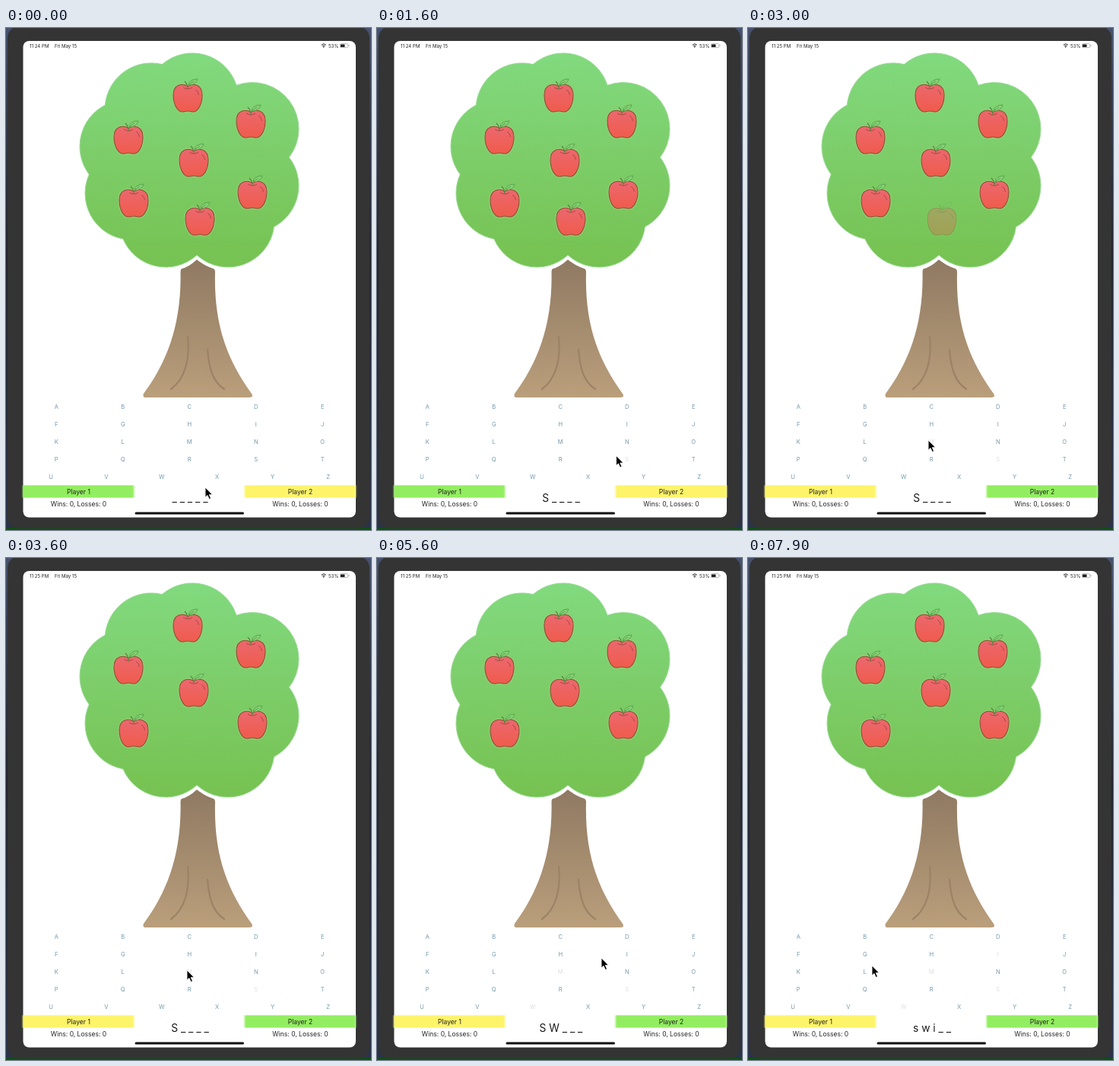
These frames come from a looping animation (480x659 px, 8 s). An HTML page:

```html
<!DOCTYPE html>
<html lang="en">
<head>
<meta charset="utf-8">
<title>Apple tree word game</title>
<style>
  html, body { margin: 0; width: 100%; height: 100%; overflow: hidden; background: #343434; }
  svg { display: block; width: 480px; height: 659px; }
  text { font-family: Inter, Roboto, sans-serif; fill: #222; }
  .mid { text-anchor: middle; }
  .status { font-size: 6.1px; }
  .label { font-size: 8.5px; }
  #keys text { font-size: 7.6px; fill: #7299ad; text-anchor: middle; }
  #word { font-size: 13.8px; fill: #1a1a1a; }
</style>
</head>
<body>
<svg viewBox="0 0 480 659">
  <defs>
    <linearGradient id="edge" x2="0" y2="1">
      <stop stop-color="#465270"/><stop offset=".12" stop-color="#364055"/>
      <stop offset=".45" stop-color="#20242f"/><stop offset="1" stop-color="#29334a"/>
    </linearGradient>
    <linearGradient id="crown" x2="0" y2="1">
      <stop stop-color="#81da7e"/><stop offset=".45" stop-color="#7dce6b"/><stop offset="1" stop-color="#76c251"/>
    </linearGradient>
    <linearGradient id="bark" x2="0" y2="1">
      <stop stop-color="#8f7962"/><stop offset="1" stop-color="#ba9f7b"/>
    </linearGradient>
    <linearGradient id="skin" x2="0" y2="1">
      <stop stop-color="#eb686f"/><stop offset="1" stop-color="#f05b4b"/>
    </linearGradient>
    <filter id="soft" x="-10%" y="-30%" width="120%" height="160%"><feGaussianBlur stdDeviation=".8 .3"/></filter>
    <path id="body" d="M0-15.500C-7-20-19-18-19-4C-19 9-13 18-7 18C-4 18-3 17 0 17C3 17 4 18 7 18C13 18 19 9 19-4C19-18 7-20 0-15.500Z"/>
    <g id="apple">
      <use href="#body" fill="none" stroke="#90d276" stroke-width="3.500"/>
      <use href="#body" fill="url(#skin)" stroke="#8a5234" stroke-width="1.100"/>
      <path d="M-6-14Q0-10 6-14M10-11Q14-9 14.500-4" fill="none" stroke="#a8453a" stroke-width=".9"/>
      <path d="M0-12Q0-18-4-22" fill="none" stroke="#5a8440" stroke-width="1.200"/>
      <path d="M1-17Q2-25 13-25Q11-17 1-17ZM2-18L8-22" fill="#83d274" stroke="#5a9f4b" stroke-width=".9"/>
    </g>
  </defs>

  <rect width="480" height="659" fill="url(#edge)"/>
  <rect y="656" width="480" height="3" fill="#104d17"/>
  <rect x="2" y="-2" width="476" height="659" rx="15" fill="#343434"/>
  <rect x="22.500" y="17" width="437.500" height="625.500" rx="8" fill="#fff"/>

  <text class="status" id="clock" x="31" y="25.500"></text>
  <text class="status" x="64" y="25.500">Fri May 15</text>
  <g fill="none" stroke="#222">
    <path d="M414.800 22.200Q417.800 19.400 420.800 22.200M416.100 23.800Q417.800 22.200 419.500 23.800"/>
    <circle cx="417.800" cy="25" r=".4"/>
    <rect x="439.300" y="20.700" width="10.500" height="5" rx="1.300" stroke="#888" stroke-width=".6"/>
    <path d="M451 22.400v1.600" stroke="#888" stroke-width=".7"/>
  </g>
  <rect x="440" y="21.400" width="5.500" height="3.600" rx=".6" fill="#222"/>
  <text class="status" x="424" y="25.500">53%</text>

  <path d="M251 304Q240 314 231 316Q229.500 317 229.500 320C231 390 211 440 181 480Q179 485 184 485H320Q326 485 323 480C291 435 273 390 275 320Q275 317 273 316Q262 313 251 304Z" fill="url(#bark)"/>
  <path d="M239 405C242 436 235 461 217 474M265 422C267 449 273 465 287 474" fill="none" stroke="#9c8266" stroke-width="2.200" stroke-linecap="round"/>
  <path id="canopy" fill="url(#crown)" stroke="#9bdb96" stroke-width="1"/>
  <g id="apples"></g>

  <g id="keys"></g>
  <g filter="url(#soft)">
    <rect id="bar1" x="22" y="600.300" width="146.300" height="16.300"/>
    <rect id="bar2" x="313.700" y="600.300" width="146.300" height="16.300"/>
  </g>
  <g class="mid">
    <text class="label" x="95.500" y="611.700">Player 1</text>
    <text class="label" x="387" y="611.700">Player 2</text>
    <text class="label" x="95.500" y="627.600">Wins: 0, Losses: 0</text>
    <text class="label" x="387" y="627.600">Wins: 0, Losses: 0</text>
    <text id="word" x="242" y="621.800"></text>
  </g>
  <rect x="169.500" y="635.500" width="143.500" height="3" rx="1.500" fill="#111"/>
  <path id="cursor" d="M0 0V13.200L3 10.500L5.200 15.500L7.500 14.500L5.300 9.700H9.500Z" fill="#000" stroke="#fff" stroke-width=".9"/>
</svg>
<script>
const LOOP = 8000;
const TAP = { S: 1300, M: 2800, W: 4700, I: 6400 };
const CLOCK_TICK = 1700;
const GREEN = '#92ee60', YELLOW = '#fdf46b';

// Cursor stops: time, x, y
const PATH = [
  [0, 262, 603], [100, 262, 603], [750, 329, 565], [1400, 329, 565],
  [2200, 237, 542], [2900, 237, 541], [3700, 238, 541], [4500, 205, 587],
  [4900, 205, 587], [5600, 295, 525], [6100, 331, 516], [6950, 331, 516],
  [7900, 163, 535], [8000, 150, 533]
];

const $ = id => document.getElementById(id);
const clamp = v => Math.max(0, Math.min(1, v));

function add(parent, tag, attrs, text = '') {
  const el = document.createElementNS('http://www.w3.org/2000/svg', tag);
  for (const name in attrs) el.setAttribute(name, attrs[name]);
  el.textContent = text;
  return parent.appendChild(el);
}

// Canopy lobes: equal circles, clockwise from the top
const LOBE = 61;
const lobes = [[245, 94], [324, 132.5], [324, 207], [292, 253], [210, 253], [165, 217], [158, 155.5], [191, 107]];

// Outer crossing point of two neighbouring lobes
function notch([ax, ay], [bx, by]) {
  const dx = bx - ax, dy = by - ay, d = Math.hypot(dx, dy);
  const h = Math.sqrt(LOBE ** 2 - d * d / 4) / d;
  return [(ax + bx) / 2 + dy * h, (ay + by) / 2 - dx * h];
}

const notches = lobes.map((lobe, i) => notch(lobe, lobes[(i + 1) % lobes.length]));
$('canopy').setAttribute('d',
  `M${notches.at(-1)}` + notches.map(p => `A${LOBE} ${LOBE} 0 0 1 ${p}`).join('') + 'Z');

const apples = [[239, 92], [322, 126], [161, 147], [247, 177], [168, 230], [324, 219], [255, 254]]
  .map(([x, y]) => add($('apples'), 'use', { href: '#apple', x, y }));

const keys = {};
['ABCDE', 'FGHIJ', 'KLMNO', 'PQRST', 'UVWXYZ'].forEach((row, r) => {
  const pitch = 437.5 / row.length;
  [...row].forEach((letter, c) => {
    keys[letter] = add($('keys'), 'text', { x: 22.5 + pitch * (c + .5), y: 499.8 + 23 * r }, letter);
  });
});

function cursorAt(t) {
  const i = Math.max(1, PATH.findIndex(p => p[0] >= t));
  const [t0, x0, y0] = PATH[i - 1], [t1, x1, y1] = PATH[i];
  const k = clamp((t - t0) / (t1 - t0));
  const e = k * k * (3 - 2 * k);
  return [x0 + (x1 - x0) * e, y0 + (y1 - y0) * e];
}

function render(t) {
  const word = t < TAP.S ? '_____' : t < TAP.W ? 'S____' : t < TAP.I ? 'SW___' : 'swi__';
  $('word').textContent = [...word].join(' ');
  $('clock').textContent = t < CLOCK_TICK ? '11:24 PM' : '11:25 PM';
  for (const letter in TAP) keys[letter].style.fill = t < TAP[letter] ? '' : '#dedede';

  const missed = t >= TAP.M;
  $('bar1').setAttribute('fill', missed ? YELLOW : GREEN);
  $('bar2').setAttribute('fill', missed ? GREEN : YELLOW);
  apples[6].setAttribute('opacity', 1 - clamp((t - TAP.M) / 300));
  $('cursor').setAttribute('transform', `translate(${cursorAt(t)})`);
}

const start = performance.now();
function frame() {
  render((performance.now() - start) % LOOP);
  requestAnimationFrame(frame);
}
frame();
</script>
</body>
</html>
```
